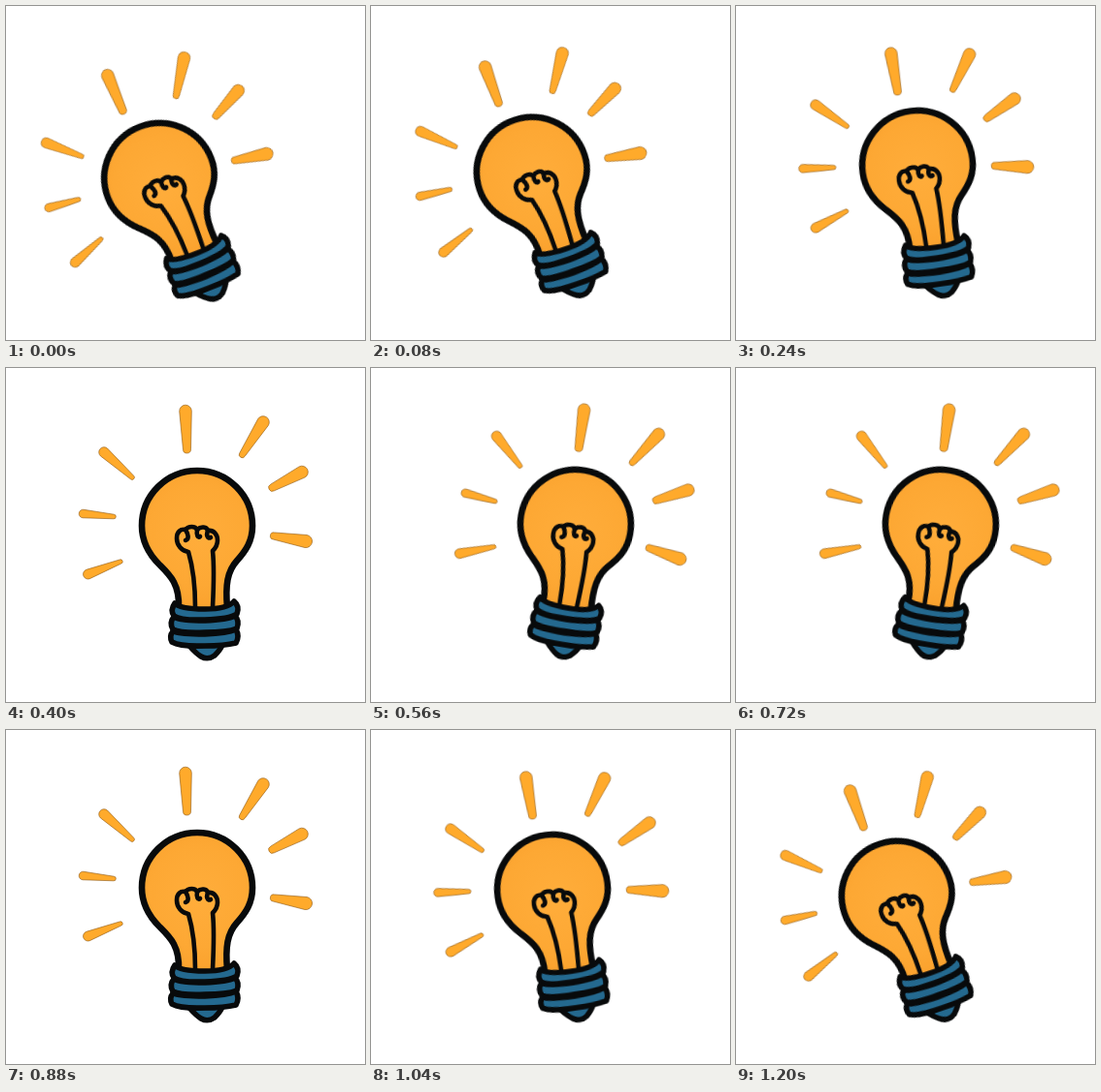
Write an HTML page that moves like this. It is 370 by 345 pixels and loops after 1.28 s.

```html
<!DOCTYPE html>
<html lang="en">
<head>
<meta charset="utf-8">
<title>Light bulb</title>
<style>
html, body { margin: 0; width: 100%; height: 100%; overflow: hidden; background: #fff; }
svg { display: block; width: 100%; height: 100%; }

#lamp {
  transform-origin: 197px 162px;
  animation: swing 1280ms step-end infinite;
}
.ink { fill: none; stroke: #080a0b; stroke-linecap: round; stroke-linejoin: round; }
.glass { fill: url(#glow); stroke-width: 6.6; }
.wire { stroke-width: 4.6; }
.base { fill: #24698f; stroke-width: 5.6; }
#rays { fill: #ffaa2b; stroke: #8a5510; stroke-width: .6; }

/* There and back: each pose serves both directions */
@keyframes swing {
  0%, 100%       { transform: translate(-39px, 15px) rotate(-21deg); }
  6.25%, 93.75%  { transform: translate(-31.3px, 8.8px) rotate(-18.2deg); }
  12.5%, 87.5%   { transform: translate(-17.5px, 6px) rotate(-11.4deg); }
  18.75%, 81.25% { transform: translate(-10px, 2px) rotate(-7.5deg); }
  25%, 75%       { transform: translate(-5px, 1.5px) rotate(-3.8deg); }
  31.25%, 68.75% { transform: translate(0, 0) rotate(0deg); }
  37.5%, 62.5%   { transform: translate(7px, 0) rotate(5deg); }
  43.75%, 56.25% { transform: translate(14px, -1px) rotate(10deg); }
  50%            { transform: translate(25px, 6px) rotate(14.5deg); }
}
</style>
</head>
<body>
<svg viewBox="0 0 370 345">
  <defs>
    <radialGradient id="glow" gradientUnits="userSpaceOnUse" cx="199" cy="172" r="84">
      <stop offset="0" stop-color="#ffad3b"/>
      <stop offset=".62" stop-color="#fda834"/>
      <stop offset="1" stop-color="#f9a02c"/>
    </radialGradient>
  </defs>
  <g id="lamp">
    <g id="rays"></g>

    <path class="ink glass" d="M178 248 C179 223 169 214 158 203 C146 191 140 178 140 163
      A57 57 0 0 1 254 163 C254 179 247 189 238 199 C228 210 226 224 228 248"/>

    <g class="ink wire">
      <path d="M195 247 C195 226 193 207 188 190 C181 189 176 183 176 176
        C176 169 180 166 185 167 C188 163 195 163 197 167
        C201 163 207 164 208 168 C214 167 218 172 218 178 C218 184 215 187 213 189
        C215 207 214 227 213 247"/>
      <path d="M185 167 C188 172 189 177 185 178 M197 167 C196 173 198 176 200 174
        M208 168 C206 173 208 177 211 175"/>
    </g>

    <g class="ink base">
      <path d="M189 287 Q196 295 201 298 Q208 302 215 297 Q221 291 223 286 Z"/>
      <path d="M172 272 Q180 275 205 275 Q228 274 237 270 Q241 277 237 284
        Q225 287 205 287 Q180 288 171 283 Q168 277 172 272 Z"/>
      <path d="M173 257 Q180 261 205 261 Q228 260 236 256 Q241 261 238 269
        Q228 273 205 273 Q180 274 172 270 Q168 263 173 257 Z"/>
      <path d="M174 243 Q179 249 205 249 Q228 249 235 241 Q241 246 238 254
        Q231 259 205 260 Q180 261 173 256 Q169 250 174 243 Z"/>
    </g>
  </g>
</svg>
<script>
// Outer end x, y, radius; inner end x, y, radius
const rays = [
  [185, 44.5, 6.3, 186.5, 84, 4],
  [265, 56, 6.3, 243.5, 89.5, 3.2],
  [305, 107.5, 6.3, 274.5, 123.5, 3.8],
  [309, 179, 6.6, 276, 173.5, 3.6],
  [101, 87, 5.3, 130, 113, 2.4],
  [79.5, 150.5, 4.3, 111, 153.5, 2.3],
  [84.5, 213, 5, 118, 200, 2.2]
];

// Two round caps joined by straight sides
function taper([x1, y1, r1, x2, y2, r2]) {
  const a = Math.atan2(y2 - y1, x2 - x1);
  const nx = -Math.sin(a), ny = Math.cos(a);
  const at = (x, y, r) => `${x + nx * r} ${y + ny * r}`;
  return `M${at(x1, y1, r1)} A${r1} ${r1} 0 0 1 ${at(x1, y1, -r1)} ` +
    `L${at(x2, y2, -r2)} A${r2} ${r2} 0 0 1 ${at(x2, y2, r2)} Z`;
}

document.getElementById("rays").innerHTML =
  rays.map(ray => `<path d="${taper(ray)}"/>`).join("");
</script>
</body>
</html>
```
